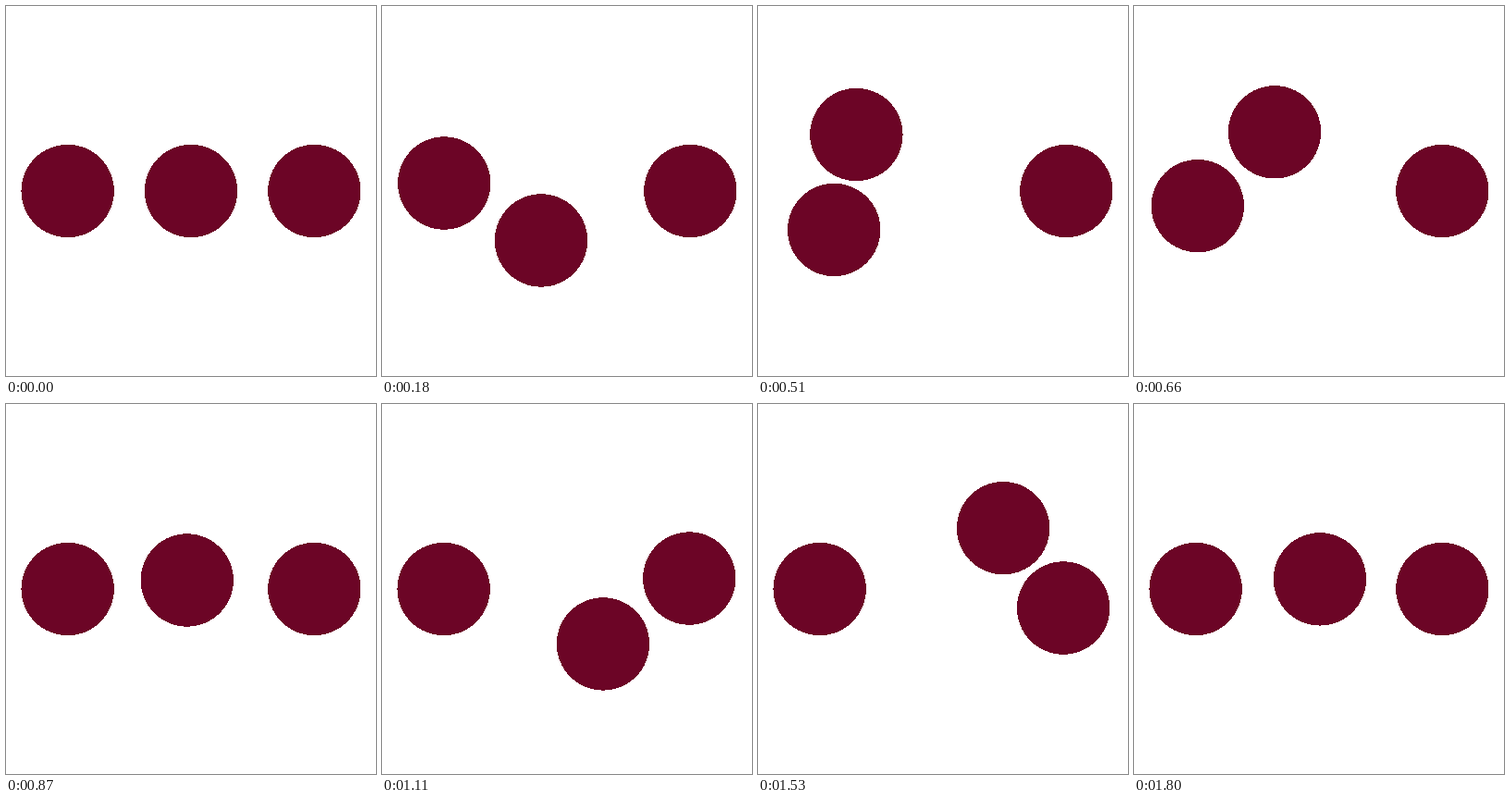
These frames come from a looping animation (400 px wide and 400 px high, 1.83 s). An HTML page:

```html
<!DOCTYPE html>
<html lang="en">
<head>
<meta charset="utf-8">
<title>Swapping dots</title>
<style>
  html, body { margin: 0; width: 100%; height: 100%; overflow: hidden; background: #fff; }
  svg { display: block; width: 100%; height: 100%; }
  path { fill: none; }
  circle { fill: #6c0526; shape-rendering: crispEdges; }
</style>
</head>
<body>
<svg viewBox="0 0 400 400">
  <path id="across" d="M66.67 200 A66.67 66.67 0 0 1 133.33 133.33 C173 133.33 185 167 200 200
    C215 233 227 266.67 266.67 266.67 A66.67 66.67 0 0 0 333.33 200"/>
  <path id="toLeft" d="M200 200 A66.67 66.67 0 0 1 66.67 200"/>
  <path id="toMiddle" d="M333.33 200 A66.67 66.67 0 0 0 200 200"/>
  <circle r="50.2"/>
  <circle r="50.2"/>
  <circle r="50.2"/>
</svg>
<script>
const LOOP = 1830, STEP = 30;
const paths = ["across", "toLeft", "toMiddle"].map(id => document.getElementById(id));
const lengths = paths.map(path => path.getTotalLength());
const dots = document.querySelectorAll("circle");

const clamp = x => Math.min(1, Math.max(0, x));
const easeIn = x => 1 - Math.cos(x * Math.PI / 2);
// Sine ease-out with a slightly steadier first half
const easeOut = x => Math.sin(x * Math.PI / 2) - 0.008 * Math.sin(2 * Math.PI * x);
const easeInOut = x => x < 0.5 ? (1 - easeOut(1 - 2 * x)) / 2 : (1 + easeOut(2 * x - 1)) / 2;

const progress = [
  t => easeInOut(clamp(t / 1800)),
  t => easeOut(clamp(t / 900)),
  t => easeIn(clamp((t - 915) / 915))
];

function draw() {
  const t = Math.floor((performance.now() % LOOP + 0.5) / STEP) * STEP % LOOP;
  dots.forEach((dot, i) => {
    const p = paths[i].getPointAtLength(lengths[i] * progress[i](t));
    dot.setAttribute("cx", p.x);
    dot.setAttribute("cy", p.y);
  });
  requestAnimationFrame(draw);
}
draw();
</script>
</body>
</html>
```
